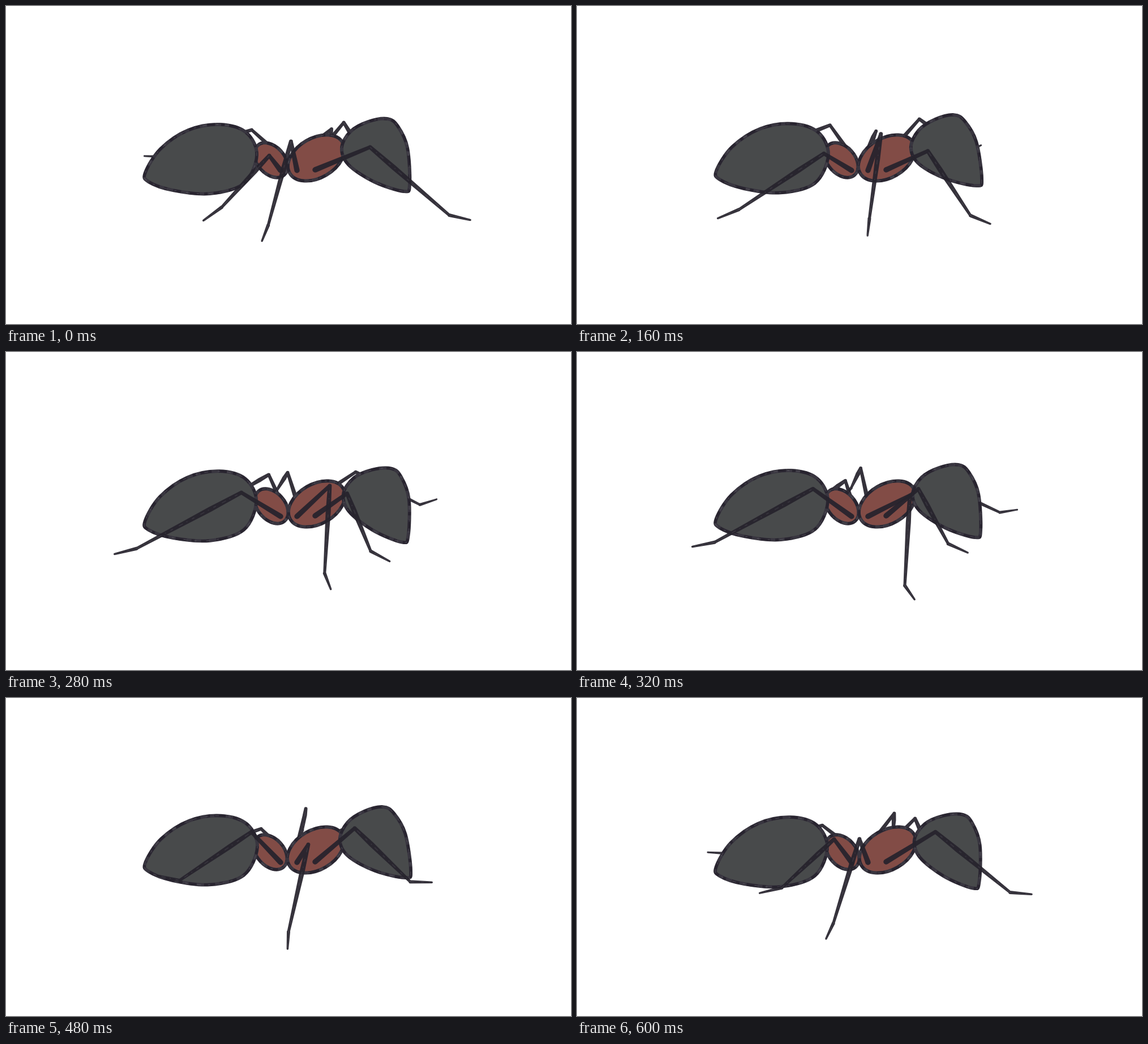
These frames come from a looping animation (998x561 px, 640 ms). An HTML page with a canvas:

```html
<!DOCTYPE html>
<html lang="en">
<head>
<meta charset="utf-8">
<title>Walking ant</title>
<style>
  html, body { margin: 0; width: 100%; height: 100%; overflow: hidden; background: #fff; }
  canvas { display: block; }
</style>
</head>
<body>
<canvas id="stage" width="998" height="561"></canvas>
<script>
const ctx = document.getElementById('stage').getContext('2d');
const STEP = 40, STEPS = 16, STANCE = 6.5;
const INK = 'rgba(38,35,45,.93)', GREY = '#484a4b', RED = '#824c46';

// knee, ankle: where the joint is at the back and at the front of a stride.
// lift: how far knee and ankle rise while the leg swings forward.
// toe: length, then its angle at the front, at the back, and the extra curl in the swing.
const farLegs = [
  { offset: 8, hip: [486, 265], knee: [[436, 233], [474, 227]],
    ankle: [[262, 284], [430, 258]], lift: [20, 22], toe: [36, 165, 184, 0] },
  { offset: 0, hip: [514, 264], knee: [[499, 223], [575, 217]],
    ankle: [[474, 256], [570, 256]], lift: [25, 24], toe: [20, 100, 130, -10] },
  { offset: 8, hip: [560, 250], knee: [[600, 223], [626, 227]],
    ankle: [[620, 283], [747, 283]], lift: [26, 24], toe: [31, -9, -9, -18] }
];
const nearLegs = [
  { offset: 0, hip: [485, 290], knee: [[418, 258], [465, 264]],
    ankle: [[226, 362], [381, 355]], lift: [25, 37], toe: [40, 144, 166, 40] },
  { offset: 8, hip: [514, 290], knee: [[500, 262], [588, 253]],
    ankle: [[449, 413], [579, 412]], lift: [32, 38], toe: [30, 55, 117, 12] },
  { offset: 0, hip: [546, 289], knee: [[605, 260], [643, 249]],
    ankle: [[640, 370], [783, 369]], lift: [25, 46], toe: [38, 13, 29, -20] }
];

const ellipse = (x, y, rx, ry, degrees) => {
  const path = new Path2D();
  path.ellipse(x, y, rx, ry, degrees * Math.PI / 180, 0, 2 * Math.PI);
  return path;
};

// Closed smooth curve through a few points.
function smooth(points) {
  const n = points.length, at = i => points[(i + n) % n];
  const path = new Path2D();
  path.moveTo(...points[0]);
  for (let i = 0; i < n; i++) {
    const [p, a, b, q] = [at(i - 1), at(i), at(i + 1), at(i + 2)];
    path.bezierCurveTo(a[0] + (b[0] - p[0]) / 6, a[1] + (b[1] - p[1]) / 6,
      b[0] - (q[0] - a[0]) / 6, b[1] - (q[1] - a[1]) / 6, ...b);
  }
  path.closePath();
  return path;
}

const waist = ellipse(468, 272, 35, 24, 48);
const thorax = ellipse(548, 268, 54, 35, -30);
const gaster = smooth([[246, 294], [273, 252], [322, 219], [378, 209], [424, 223],
  [443, 263], [420, 313], [360, 331], [295, 325], [252, 310]]);
const head = smooth([[593, 250], [609, 221], [640, 204], [674, 199], [692, 212],
  [709, 250], [713, 315], [703, 327], [650, 310], [605, 280]]);

const mix = (a, b, u) => a.map((v, i) => v + (b[i] - v) * u);

// The foot slides back evenly on the ground, then swings forward through the air.
function poseLeg({ offset, hip, knee, ankle, lift, toe }, t) {
  const j = (t + offset) % STEPS;
  const swing = Math.max(0, (j - STANCE) / (STEPS - STANCE));
  const reach = swing ? swing ** 1.2 : 1 - j / STANCE;
  const arc = Math.sin(Math.PI * swing), rise = Math.sqrt(arc);
  const [kx, ky] = mix(...knee, reach), [ax, ay] = mix(...ankle, reach);
  const [length, front, back, curl] = toe;
  const angle = (back + (front - back) * reach + curl * 1.7 * swing * arc) * Math.PI / 180;
  const foot = [ax, ay - lift[1] * rise];
  return [hip, [kx - 9 * rise, ky - lift[0] * rise], foot,
    [foot[0] + length * Math.cos(angle), foot[1] + length * Math.sin(angle)]];
}

function taper(path, [ax, ay], [bx, by], wa, wb) {
  const len = Math.hypot(bx - ax, by - ay) || 1;
  const nx = (by - ay) / len / 2, ny = (ax - bx) / len / 2;
  path.moveTo(ax + nx * wa, ay + ny * wa);
  path.lineTo(bx + nx * wb, by + ny * wb);
  path.lineTo(bx - nx * wb, by - ny * wb);
  path.lineTo(ax - nx * wa, ay - ny * wa);
  path.closePath();
  for (const [x, y, w] of [[ax, ay, wa], [bx, by, wb]]) {
    path.moveTo(x + w / 2, y);
    path.arc(x, y, w / 2, 0, 7);
  }
}

// Dry-marker texture along a line.
function grain(path, color, width, dash, shift) {
  ctx.strokeStyle = color;
  ctx.lineWidth = width;
  ctx.setLineDash(dash);
  ctx.lineDashOffset = shift;
  ctx.stroke(path);
  ctx.setLineDash([]);
}

function drawLeg(leg, t, size) {
  const [hip, knee, ankle, toe] = poseLeg(leg, t);
  const calf = mix(knee, ankle, .3);
  const path = new Path2D(), spine = new Path2D();
  taper(path, hip, knee, 9.5 * size, 6.5 * size);
  taper(path, knee, calf, 7 * size, 9 * size);
  taper(path, calf, ankle, 9 * size, 5 * size);
  taper(path, ankle, toe, 6 * size, 3.5 * size);
  ctx.fillStyle = INK;
  ctx.fill(path);
  spine.moveTo(...knee);
  spine.lineTo(...ankle);
  spine.lineTo(...toe);
  grain(spine, 'rgba(100,98,108,.28)', 1.5, [5, 9, 2, 7, 8, 12], t * 5);
}

function drawBlob(path, fill, t) {
  ctx.fillStyle = fill;
  ctx.fill(path);
  ctx.strokeStyle = '#38353f';
  ctx.lineWidth = 6;
  ctx.stroke(path);
  grain(path, 'rgba(30,25,38,.6)', 5, [14, 11, 6, 8, 20, 13], t % 8 * 7);
  grain(path, 'rgba(100,98,106,.35)', 2, [4, 12, 7, 17], t % 8 * 5);
}

function turned(x, y, degrees, dx, paint) {
  ctx.save();
  ctx.translate(x + dx, y);
  ctx.rotate(degrees * Math.PI / 180);
  ctx.translate(-x, -y);
  paint();
  ctx.restore();
}

function draw(t) {
  ctx.fillStyle = '#fff';
  ctx.fillRect(0, 0, 998, 561);

  // The body sways twice per walk cycle.
  const phase = t / 8 * 2 * Math.PI, c = Math.cos(phase), s = Math.sin(phase);
  const nod = 2.5 * c - 7.5 * s - 2.5;
  const sway = .57 - .6 * c + 1.85 * s;

  for (const leg of farLegs) drawLeg(leg, t, .85);
  turned(0, 0, 0, nod * .2, () => {
    drawBlob(waist, RED, t);
    drawBlob(thorax, RED, t);
  });
  turned(443, 262, sway, sway * .8, () => drawBlob(gaster, GREY, t));
  turned(593, 250, nod, nod * .65, () => drawBlob(head, GREY, t));
  for (const leg of nearLegs) drawLeg(leg, t, 1);
}

const start = performance.now();
function tick() {
  draw(Math.floor((performance.now() - start) / STEP) % STEPS);
  requestAnimationFrame(tick);
}
tick();
</script>
</body>
</html>
```
